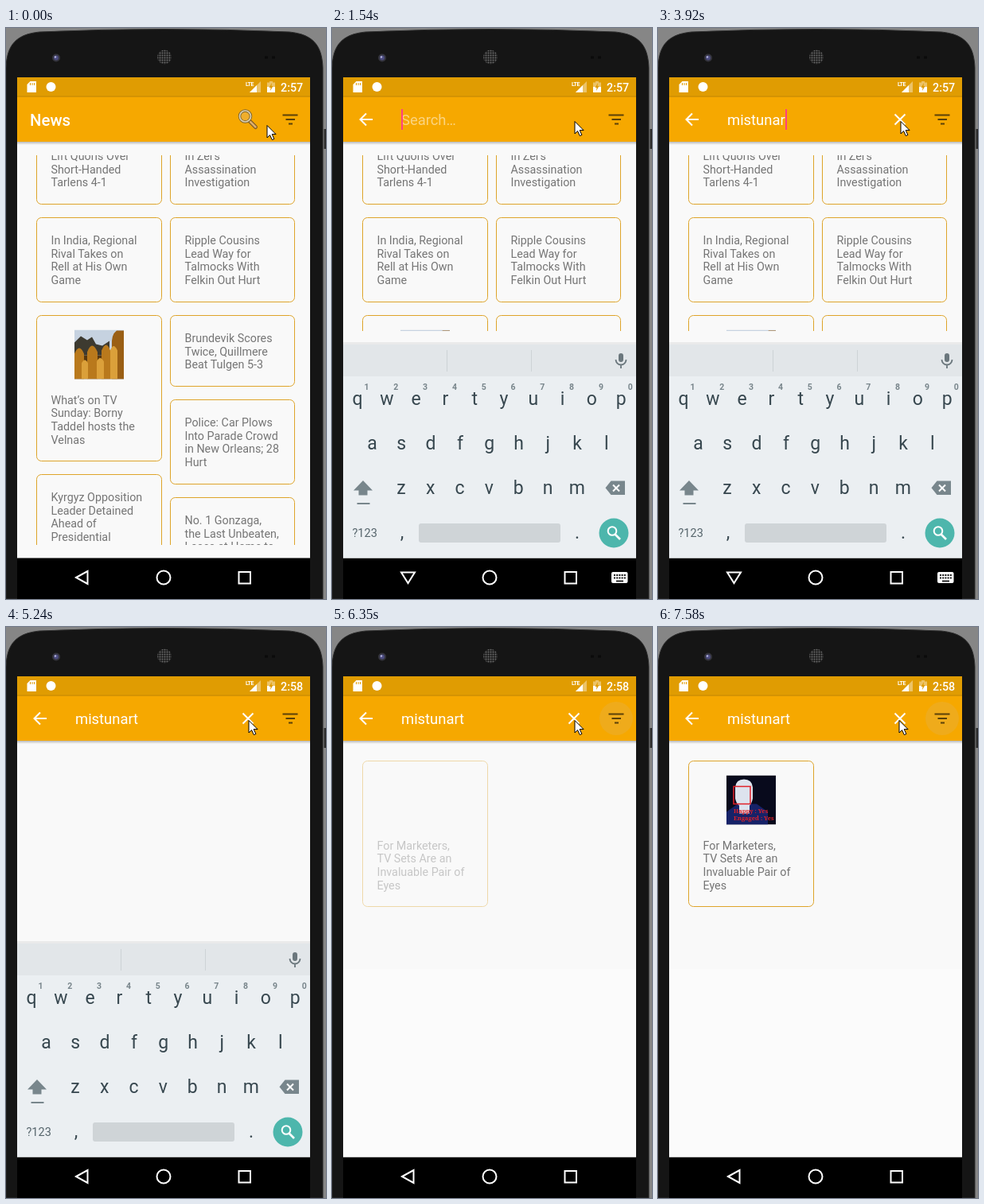
These frames come from a looping animation (402x718 px, 8000 ms). An HTML page:

```html
<!DOCTYPE html>
<html lang="en">
<head>
<meta charset="utf-8">
<title>News search</title>
<style>
  html, body { margin: 0; width: 100%; height: 100%; overflow: hidden; background: #868686; }
  svg { display: block; width: 402px; height: 718px; font-family: Roboto, sans-serif; }
  text { white-space: pre; }
  .line { fill: none; stroke: #fff; stroke-width: 2; }
  .card rect.edge { fill: none; stroke: #dea42a; }
  .card text { font-size: 14.3px; fill: #757575; }
  .card .tag { font: 700 7.5px "Noto Serif", serif; fill: #e02028; }
  .key { font-size: 23px; fill: #37474f; text-anchor: middle; }
  .digit { font-size: 10.5px; font-weight: 700; fill: #78858b; text-anchor: middle; }
</style>
</head>
<body>
<svg viewBox="0 0 402 718">
  <defs>
    <pattern id="mesh" width="3" height="3" patternUnits="userSpaceOnUse">
      <rect width="3" height="3" fill="#1c1c1c"/><circle cx="1.5" cy="1.5" r="1" fill="#6a6a6a"/>
    </pattern>
    <linearGradient id="shade" x2="0" y2="1">
      <stop stop-color="#000" stop-opacity=".26"/><stop offset="1" stop-color="#000" stop-opacity="0"/>
    </linearGradient>
    <clipPath id="listClip"><rect id="listWindow" x="14" y="160" width="368" height="490"/></clipPath>
    <clipPath id="photoClip"><rect x="86" y="18" width="62" height="62"/></clipPath>
  </defs>

  <!-- Phone body -->
  <path d="M0 718V50C1 22 12 8 42 5Q120 1.500 199 1.500T356 5C386 8 397 22 398 50V718Z" fill="#151515" stroke="#2b2b2b"/>
  <rect x="399.5" y="127" width="3" height="25" fill="#2a2a2a"/>
  <circle cx="63" cy="37.5" r="5" fill="#34343c"/>
  <circle cx="63" cy="37.5" r="3" fill="#4c4c80"/>
  <circle cx="62" cy="36.5" r="1.2" fill="#b4b4dc"/>
  <circle cx="199" cy="36.5" r="9" fill="url(#mesh)"/>
  <path d="M325 37h4m5 0h4" stroke="#0b0b0b" stroke-width="3"/>

  <!-- Screen -->
  <rect x="14" y="62" width="368" height="656"/>
  <rect x="14" y="143" width="368" height="523.5" fill="#f9f9f9"/>
  <rect id="lowerPage" x="14" y="430" width="368" height="236.5" fill="#fbfbfb"/>
  <g clip-path="url(#listClip)"><g id="list"></g></g>
  <g id="result"></g>

  <!-- Status bar -->
  <rect x="14" y="62" width="368" height="25" fill="#e09c02"/>
  <path d="M14 86h368" stroke="#c98b04"/>
  <path d="M30.5 67h7.5v14h-11.5v-10z" fill="#fff"/>
  <path d="M30.5 69v3m2.5-3v3m2.5-3v3" stroke="#e09c02"/>
  <circle cx="56.5" cy="74" r="6" fill="#fff"/>
  <text x="301" y="73" font-size="7" font-weight="700" fill="#fff" letter-spacing="-.5">LTE</text>
  <path d="M320 67v14h-14z" fill="#fff" opacity=".4"/>
  <path d="M315 72v9h-9z" fill="#fff"/>
  <path d="M328 68.5h3v-1.5h4v1.5h3v12.5h-10z" fill="#fff" opacity=".4"/>
  <path d="M328 74h10v7h-10z" fill="#fff"/>
  <path d="M334 69l-3.5 6h2l-.5 4 3.5-6h-2z" fill="#e09c02"/>
  <text id="clock" x="345" y="79.5" font-size="14.3" font-weight="500" fill="#fff"></text>

  <!-- Toolbar -->
  <rect x="14" y="87" width="368" height="56" fill="#f6a800"/>
  <rect x="14" y="143" width="368" height="4" fill="url(#shade)"/>
  <circle id="ripple" cx="357" cy="115" r="21" fill="#dcb45a" opacity=".3"/>
  <path d="M347.5 109.5h19m-15 5.5h11.5m-8 5.5h5" stroke="#5b4109" stroke-width="2"/>
  <g id="titleBar">
    <text x="30" y="122.5" font-size="20.4" font-weight="500" fill="#fff">News</text>
    <path d="M306 117l7.5 7.5" stroke="#7d5a24" stroke-width="5" stroke-linecap="round"/>
    <path d="M307 118l6.5 6.5" stroke="#dcae6c" stroke-width="2.5" stroke-linecap="round"/>
    <circle cx="300.5" cy="111" r="7" fill="#f0ae2c" stroke="#7d6530" stroke-width="3.5"/>
    <circle cx="300.5" cy="111" r="7" fill="none" stroke="#dccfae" stroke-width="1.7"/>
  </g>
  <g id="searchBar">
    <path class="line" d="M51 115H35.5m7.5-7.5L35.5 115l7.5 7.5"/>
    <text id="hint" x="87" y="122" font-size="18.4" fill="#fff" opacity=".5">Search…</text>
    <text id="query" x="87" y="122" font-size="18.4" fill="#fff"></text>
    <rect id="caret" y="102" width="2" height="26" fill="#ff4081"/>
    <path id="clear" class="line" d="M297.5 108.5l13 13m0-13l-13 13"/>
  </g>

  <!-- Keyboard -->
  <g id="keyboard">
    <rect x="14" y="395" width="368" height="3" fill="#000" opacity=".06"/>
    <rect x="14" y="398" width="368" height="268.5" fill="#ebeff2"/>
    <rect x="14" y="398" width="368" height="40" fill="#e2e6e9"/>
    <path d="M144.5 405v27m106-27v27" stroke="#cdd3d6"/>
    <rect x="360" y="409" width="6" height="11" rx="3" fill="#6b777d"/>
    <path d="M356.5 417a6.5 6.5 0 0 0 13 0M363 423.5v4.5" fill="none" stroke="#6b777d" stroke-width="1.8"/>
    <g id="keys"></g>
    <path d="M39 569l12 12.5h-6.5v6h-11v-6h-6.5z" fill="#78868c"/>
    <path d="M31.5 598h16" stroke="#78868c" stroke-width="2"/>
    <path d="M350.5 569.5h17.5v17.5h-17.5l-7-8.75z" fill="#78868c"/>
    <path d="M353 574.5l8 8m0-8l-8 8" class="line"/>
    <text x="25.5" y="640" font-size="14.5" fill="#56656c">?123</text>
    <rect x="109" y="623" width="178" height="24" rx="3" fill="#cfd4d7"/>
    <circle cx="354" cy="635" r="18.5" fill="#4db6ac"/>
    <circle cx="352" cy="632.5" r="5.3" class="line"/>
    <path d="M355.5 636.5l6.5 6.5" class="line" style="stroke-width:2.6"/>
  </g>

  <!-- Navigation bar -->
  <path id="back" class="line"/>
  <circle class="line" cx="198" cy="691" r="8.5"/>
  <rect class="line" x="292.5" y="684" width="14.5" height="14.5"/>
  <g id="imeIcon">
    <rect x="351" y="684" width="20.5" height="14" rx="2" fill="#fff"/>
    <path d="M354 688h15m-15 3.5h15" stroke="#111" stroke-width="2" stroke-dasharray="2 1.2"/>
    <path d="M357 695.5h9" stroke="#111" stroke-width="1.8"/>
  </g>

  <path id="pointer" d="M.5.5v15.5l3.6-3.4 2.7 6 2.6-1.1-2.7-5.9h4.9z" fill="#fff" stroke="#000"/>
</svg>
<script>
const LOOP = 8000;
const LEADING = 16.7;
const $ = id => document.getElementById(id);

const statuesPhoto = `<g clip-path="url(#photoClip)">
  <rect x="86" y="18" width="62" height="62" fill="#c6d2e0"/>
  <path d="M86 34l8-8 8 5 6-4 5 9 8 2 9-6v18H86z" fill="#3d3a30"/>
  <path d="M86 50h62v30H86z" fill="#57370f"/>
  <path d="M86 80V48q6-14 12 0v32zm16 0V46q6-16 13 0v34zm18 0V44q6-14 11 0v36z" fill="#b9791c"/>
  <path d="M133 80V38q-1-14 6-19h9v61z" fill="#9a5f14"/>
  <path d="M95 80V60q4-8 8 0v20zm19 0V58q4-9 9 0v22zm17 0V44q4-11 9 0v36z" fill="#dba03a"/></g>`;

const detectionPhoto = `<g clip-path="url(#photoClip)">
  <rect x="86" y="18" width="62" height="62" fill="#080a1c"/>
  <path d="M86 64l14-10h24l14 10v16H86z" fill="#162268"/>
  <path d="M97 33q1-10 11-10t11 10v14q-1 6-4 9v10h-13V56q-4-3-5-9z" fill="#dde3ee"/>
  <rect x="95" y="32" width="21" height="22" fill="none" stroke="#e02028" stroke-width="1.5"/>
  <text class="tag" x="95" y="65">Happy : Yes</text>
  <text class="tag" x="95" y="74">Engaged : Yes</text></g>`;

const LEFT = { x: 38.5, width: 157 };
const RIGHT = { x: 206.5, width: 156 };

function card(column, y, copy, photo = '') {
  const lines = copy.split('|');
  const top = photo ? 111 : 33.5;
  const height = Math.floor(top + lines.length * LEADING + 5.8);
  const text = lines.map((line, i) => `<text x="18" y="${top + i * LEADING}">${line}</text>`).join('');
  const picture = photo && `<g class="photo" transform="translate(-38.5)">${photo}</g>`;
  return `<g class="card" transform="translate(${column.x} ${y})">
    <rect class="edge" width="${column.width}" height="${height}" rx="6"/>${text}${picture}</g>`;
}

$('list').innerHTML = [
  card(LEFT, 132.5, 'Lift Quorls Over|Short-Handed|Tarlens 4-1'),
  card(LEFT, 238.5, 'In India, Regional|Rival Takes on|Rell at His Own|Game'),
  card(LEFT, 361.5, 'What’s on TV|Sunday: Borny|Taddel hosts the|Velnas', statuesPhoto),
  card(LEFT, 561.5, 'Kyrgyz Opposition|Leader Detained|Ahead of|Presidential'),
  card(RIGHT, 132.5, 'In Zel’s|Assassination|Investigation'),
  card(RIGHT, 238.5, 'Ripple Cousins|Lead Way for|Talmocks With|Felkin Out Hurt'),
  card(RIGHT, 361.5, 'Brundevik Scores|Twice, Quillmere|Beat Tulgen 5-3'),
  card(RIGHT, 467.5, 'Police: Car Plows|Into Parade Crowd|in New Orleans; 28|Hurt'),
  card(RIGHT, 590.5, 'No. 1 Gonzaga,|the Last Unbeaten,|Loses at Home to')
].join('');
$('result').innerHTML = card(LEFT, 168.5, 'For Marketers,|TV Sets Are an|Invaluable Pair of|Eyes', detectionPhoto);
const resultPhoto = $('result').querySelector('.photo');

const keyRow = (chars, x, y, kind = 'key') => [...chars]
  .map((c, i) => `<text class="${kind}" x="${x + i * 36.8}" y="${y}">${c}</text>`).join('');
$('keys').innerHTML = keyRow('qwertyuiop', 32, 474) + keyRow('1234567890', 43.5, 454.5, 'digit') +
  keyRow('asdfghjkl', 50.5, 530) + keyRow('zxcvbnm', 87, 586) +
  keyRow(',', 88, 642) + keyRow('.', 308, 642);

const QUERY = 'mistunart';
const keyTimes = [1660, 1780, 2490, 2990, 3240, 3390, 3790, 3920, 4810];
const caretGaps = [[1110, 1540], [2340, 2490], [4530, 4810], [5240, LOOP]];

// Value of the last [time, value] step already reached
const stepAt = (t, steps) => steps.filter(([start]) => t >= start).pop()[1];
const show = (id, on) => $(id).setAttribute('display', on ? 'inline' : 'none');

function render(t) {
  const searching = t >= 550;
  const cleared = t >= 5240;
  const imeOpen = t >= 680 && !cleared;

  const [px, py] = stepAt(t, [[0, [327.5, 122]], [150, [313, 119]], [270, [304.5, 117]], [7580, [302.5, 117]]]);
  $('pointer').setAttribute('transform', `translate(${px} ${py})`);
  $('clock').textContent = t < 4380 ? '2:57' : '2:58';

  show('titleBar', !searching);
  show('searchBar', searching);
  show('ripple', t >= 5370);
  const typed = keyTimes.filter(time => t >= time).length;
  $('query').textContent = QUERY.slice(0, typed);
  show('hint', !typed);
  show('clear', typed);
  show('caret', !caretGaps.some(([from, to]) => t >= from && t < to));
  $('caret').setAttribute('x', 87 + (typed ? Math.round($('query').getComputedTextLength()) : 0));

  show('list', !cleared);
  $('listWindow').setAttribute('height', imeOpen ? 221 : 490);
  show('lowerPage', t >= 5510);

  const [drop, alpha] = stepAt(t, [[0, [0, 0]], [680, [40, .6]], [830, [0, 1]], [5370, [43, .35]], [5510, [0, 0]]]);
  $('keyboard').setAttribute('transform', `translate(0 ${drop})`);
  $('keyboard').setAttribute('opacity', alpha);
  $('back').setAttribute('d', imeOpen ? 'M87 684.5h17L95.5 698z' : 'M88 691l14.5-8v16z');
  show('imeIcon', imeOpen);

  $('result').setAttribute('opacity', stepAt(t, [[0, 0], [6350, .38], [6480, 1]]));
  resultPhoto.setAttribute('opacity', stepAt(t, [[0, 0], [6750, .5], [6900, 1]]));
}

const start = performance.now();
(function frame() {
  render((performance.now() - start) % LOOP);
  requestAnimationFrame(frame);
})();
</script>
</body>
</html>
```
